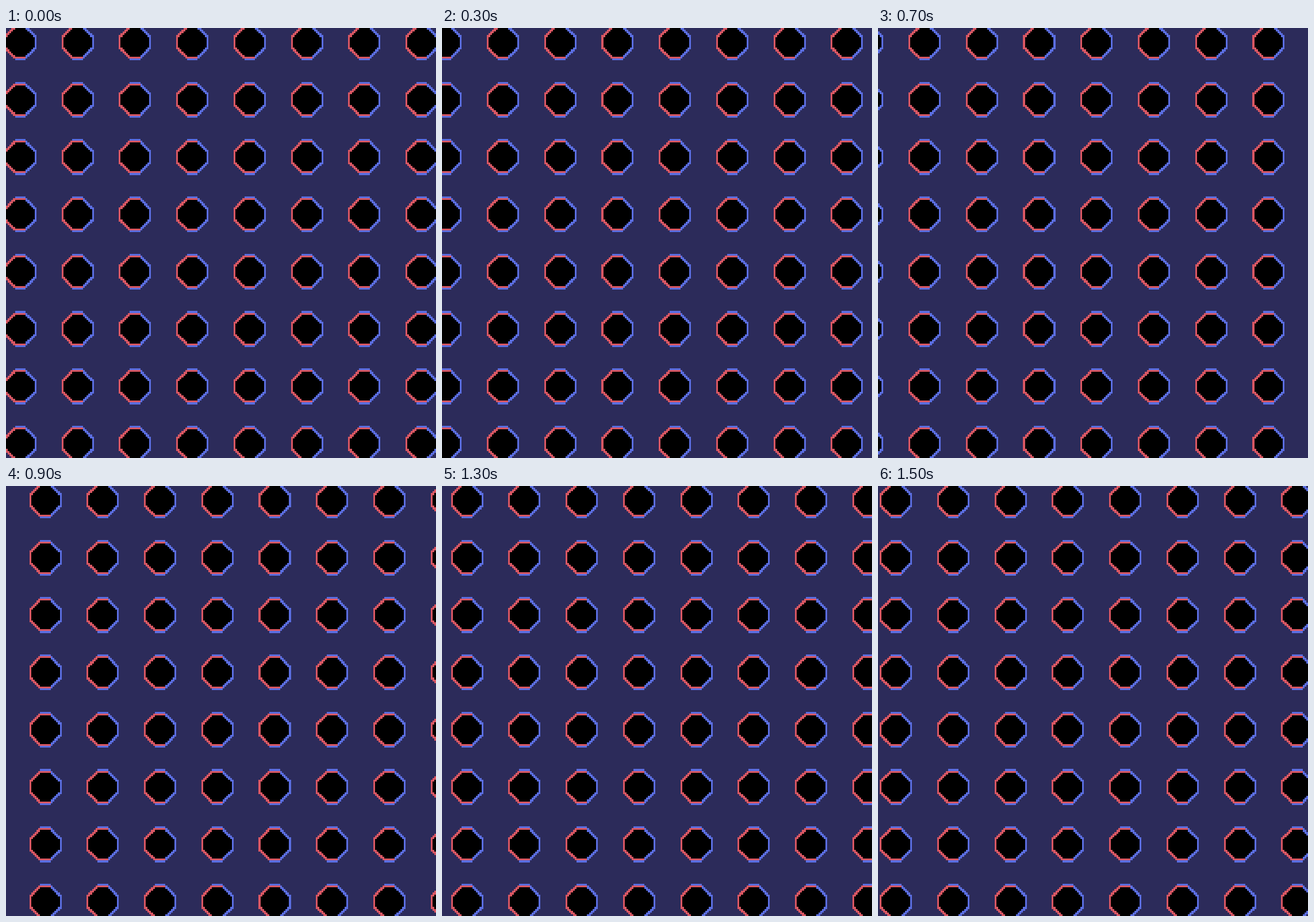
Write an HTML page with a canvas that moves like this. It is 748x748 px and loops after 1.6 s.

```html
<!DOCTYPE html>
<html>
<head>
<meta charset="utf-8">
<style>
  html, body { margin: 0; width: 748px; height: 748px; overflow: hidden; background: #2c2b5a; }
  canvas { display: block; width: 748px; height: 748px; image-rendering: pixelated; }
</style>
</head>
<body>
<canvas width="240" height="240"></canvas>
<script>
const ctx = document.querySelector('canvas').getContext('2d');
const PERIOD = 32, STEP_MS = 100, STEPS = 16;

function makeTile() {
  const tile = document.createElement('canvas');
  tile.width = tile.height = 20;
  const g = tile.getContext('2d');
  const bar = (color, x, y, w, h = 1) => {
    g.fillStyle = color;
    g.fillRect(x, y, w, h);
  };
  bar('#5b6ee1', 6, 0, 6, 20);
  for (let y = 1; y < 19; y++) {
    const inset = Math.max(0, 6 - Math.min(y, 19 - y));
    bar('#d95763', inset, y, 12 - inset);
    bar('#5b6ee1', 12, y, 6 - inset);
  }
  for (let y = 2; y < 18; y++) {
    const inset = Math.max(1, 8 - Math.min(y, 19 - y));
    bar('#000', inset, y, 18 - 2 * inset);
  }
  return tile;
}

const tile = makeTile();

function draw(now) {
  const shift = 2 * (Math.floor(now / STEP_MS) % STEPS);
  ctx.fillStyle = '#2c2b5a';
  ctx.fillRect(0, 0, 240, 240);
  for (let y = -2; y < 240; y += PERIOD)
    for (let x = -1 - shift; x < 240; x += PERIOD)
      ctx.drawImage(tile, x, y);
}

const start = performance.now();
function tick() {
  draw(performance.now() - start);
  requestAnimationFrame(tick);
}
tick();
</script>
</body>
</html>
```
